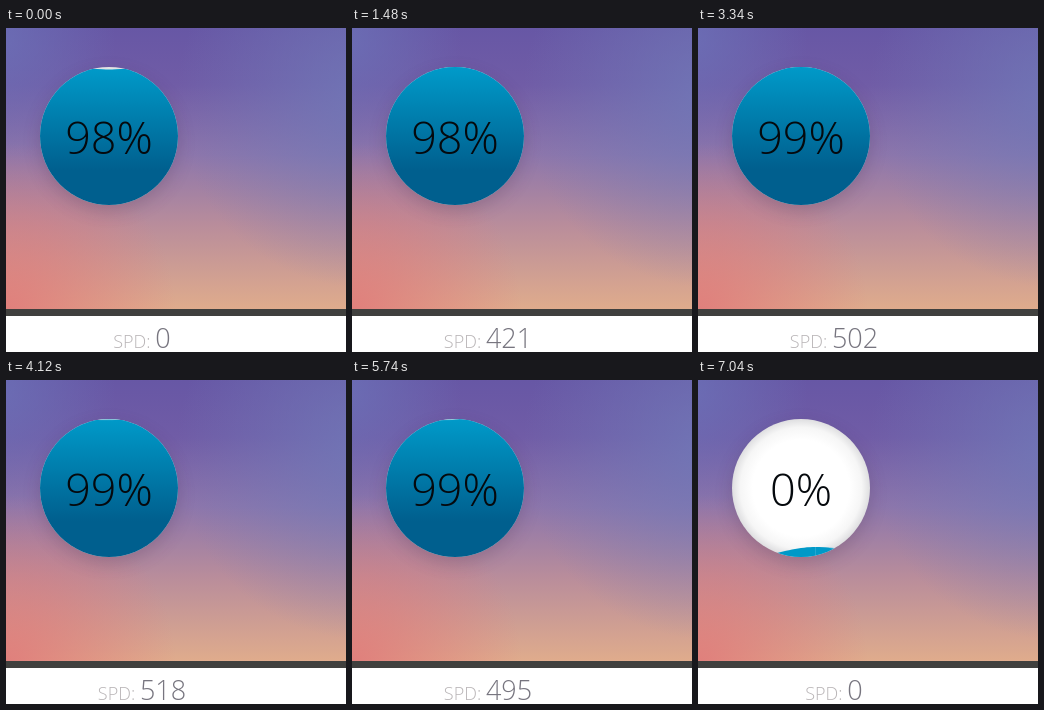
An HTML page that plays this animation: 340 px wide and 324 px high, repeating every 7060 ms.

```html
<!DOCTYPE html>
<html lang="en">
<head>
<meta charset="utf-8">
<title>Liquid gauge</title>
<style>
  html, body { margin: 0; width: 100%; height: 100%; overflow: hidden; background: #fff; }
  svg { display: block; width: 340px; height: 324px; }
  text { font-family: "Open Sans", "Noto Sans", sans-serif; text-anchor: middle; }
  #percent { font-size: 45px; font-weight: 350; fill: #05090d; }
  #speed { font-size: 18px; font-weight: 350; fill: #b9b5b7; }
  #speed tspan { font-size: 27px; fill: #77757f; }
</style>
</head>
<body>
<svg viewBox="0 0 340 324">
  <defs>
    <linearGradient id="sky" x2="0" y2="1">
      <stop offset="0" stop-color="#6757a5"/>
      <stop offset=".2" stop-color="#705ca6"/>
      <stop offset=".45" stop-color="#8d76ab"/>
      <stop offset=".7" stop-color="#b98d9b"/>
      <stop offset="1" stop-color="#e0ac8c"/>
    </linearGradient>
    <radialGradient id="blueLeft" gradientUnits="userSpaceOnUse" cx="-10" cy="10" r="120">
      <stop offset="0" stop-color="#6c72b8" stop-opacity=".8"/>
      <stop offset="1" stop-color="#6c72b8" stop-opacity="0"/>
    </radialGradient>
    <radialGradient id="blueRight" gradientUnits="userSpaceOnUse" cx="360" cy="70" r="190">
      <stop offset="0" stop-color="#7079b8" stop-opacity=".85"/>
      <stop offset="1" stop-color="#7079b8" stop-opacity="0"/>
    </radialGradient>
    <radialGradient id="coral" gradientUnits="userSpaceOnUse" cx="0" cy="285" r="170">
      <stop offset="0" stop-color="#e07a7a" stop-opacity=".9"/>
      <stop offset="1" stop-color="#e07a7a" stop-opacity="0"/>
    </radialGradient>
    <radialGradient id="ballShade">
      <stop offset=".7" stop-color="#fff"/>
      <stop offset=".88" stop-color="#f6f6f6"/>
      <stop offset="1" stop-color="#dedee0"/>
    </radialGradient>
    <linearGradient id="waterShade" x2="0" y2="1">
      <stop offset="0" stop-color="#0099c8"/>
      <stop offset=".72" stop-color="#005f8e"/>
    </linearGradient>
    <filter id="blur" x="-40%" y="-40%" width="180%" height="180%">
      <feGaussianBlur stdDeviation="9"/>
    </filter>
    <clipPath id="ball"><circle cx="103" cy="108" r="69"/></clipPath>
  </defs>

  <rect width="340" height="282" fill="url(#sky)"/>
  <rect width="340" height="282" fill="url(#blueLeft)"/>
  <rect width="340" height="282" fill="url(#blueRight)"/>
  <rect width="340" height="282" fill="url(#coral)"/>
  <rect y="281" width="340" height="7" fill="#40403e"/>
  <rect y="288" width="340" height="36" fill="#fff"/>

  <circle cx="103" cy="114" r="69" fill="#402040" opacity=".22" filter="url(#blur)"/>
  <circle cx="103" cy="108" r="69" fill="url(#ballShade)"/>
  <g clip-path="url(#ball)">
    <path id="backWave" fill="#7cc4dc"/>
    <path id="frontWave" fill="#0099c8"/>
    <path id="seam" stroke="#5fc0de" stroke-width=".7" opacity=".6"/>
    <rect id="water" x="34" width="138" height="140" fill="url(#waterShade)"/>
  </g>
  <text id="percent" x="103" y="126"></text>
  <text id="speed" x="136" y="320">SPD: <tspan id="speedValue"></tspan></text>
</svg>
<script>
  const LOOP = 7060, STEP = 60, FIRST = 40;
  const LEFT = 34, TOP = 39, SIZE = 138, WAVE_HEIGHT = 10, FADE = 250;
  const $ = id => document.getElementById(id);

  // [time, value] pairs; the first two hold each value, the last two are interpolated
  const percents = [[0, 98], [2500, 99], [6238, 0]];
  const speeds = [[0, 0], [340, 1043], [580, 512], [940, 486], [1360, 421], [1900, 467],
    [2260, 1021], [2500, 0], [2740, 473], [3340, 502], [3940, 518], [4540, 489],
    [5080, 495], [5860, 468], [6238, 0]];
  const frontCrest = [[0, 34], [1480, -280], [4120, -934], [5140, -1193], [6280, -1507], [7040, -1686]];
  const backCrest = [[0, 34], [6280, 953], [7040, 1096]];

  const indexAt = (keys, t) => keys.findLastIndex(([time]) => time <= t);
  const held = (keys, t) => keys[indexAt(keys, t)][1];

  function between(keys, t) {
    const i = Math.min(indexAt(keys, t), keys.length - 2);
    const [t0, a] = keys[i], [t1, b] = keys[i + 1];
    return a + (b - a) * (t - t0) / (t1 - t0);
  }

  // The CSS "ease" curve, solved by bisection
  function ease(x) {
    if (x >= 1) return 1;
    const bezier = (a, b, u) => 3 * a * u * (1 - u) ** 2 + 3 * b * u * u * (1 - u) + u ** 3;
    let low = 0, high = 1;
    for (let i = 0; i < 20; i++) {
      const mid = (low + high) / 2;
      if (bezier(.25, .25, mid) < x) low = mid; else high = mid;
    }
    return bezier(.1, 1, low);
  }

  function fillAt(t) {
    const i = indexAt(percents, t);
    const [start, value] = percents[i];
    if (i === 0) return value;
    const previous = percents[i - 1][1];
    return previous + (value - previous) * ease((t - start) / FADE);
  }

  function wavePath(crest, level) {
    let d = `M${LEFT} ${level + 1}`;
    for (let x = LEFT; x <= LEFT + SIZE; x += 3) {
      const lift = WAVE_HEIGHT / 2 * (1 + Math.cos(2 * Math.PI * (x - crest) / SIZE));
      d += `L${x} ${(level - lift).toFixed(2)}`;
    }
    return d + `V${level + 1}Z`;
  }

  function draw(t) {
    const level = TOP + SIZE * (1 - fillAt(t) / 100);
    const crest = between(frontCrest, t);
    const seamX = LEFT + ((crest - LEFT) % SIZE + SIZE) % SIZE;
    $('backWave').setAttribute('d', wavePath(between(backCrest, t), level));
    $('frontWave').setAttribute('d', wavePath(crest, level));
    $('seam').setAttribute('d', `M${seamX} ${level - WAVE_HEIGHT}V${level}`);
    $('water').setAttribute('y', level);
    $('percent').textContent = held(percents, t) + '%';
    $('speedValue').textContent = held(speeds, t);
  }

  const start = performance.now();
  function tick(now) {
    const t = Math.max(0, now - start) % LOOP;
    draw(t < FIRST ? 0 : FIRST + Math.floor((t - FIRST) / STEP) * STEP);
    requestAnimationFrame(tick);
  }
  tick(start);
</script>
</body>
</html>
```
